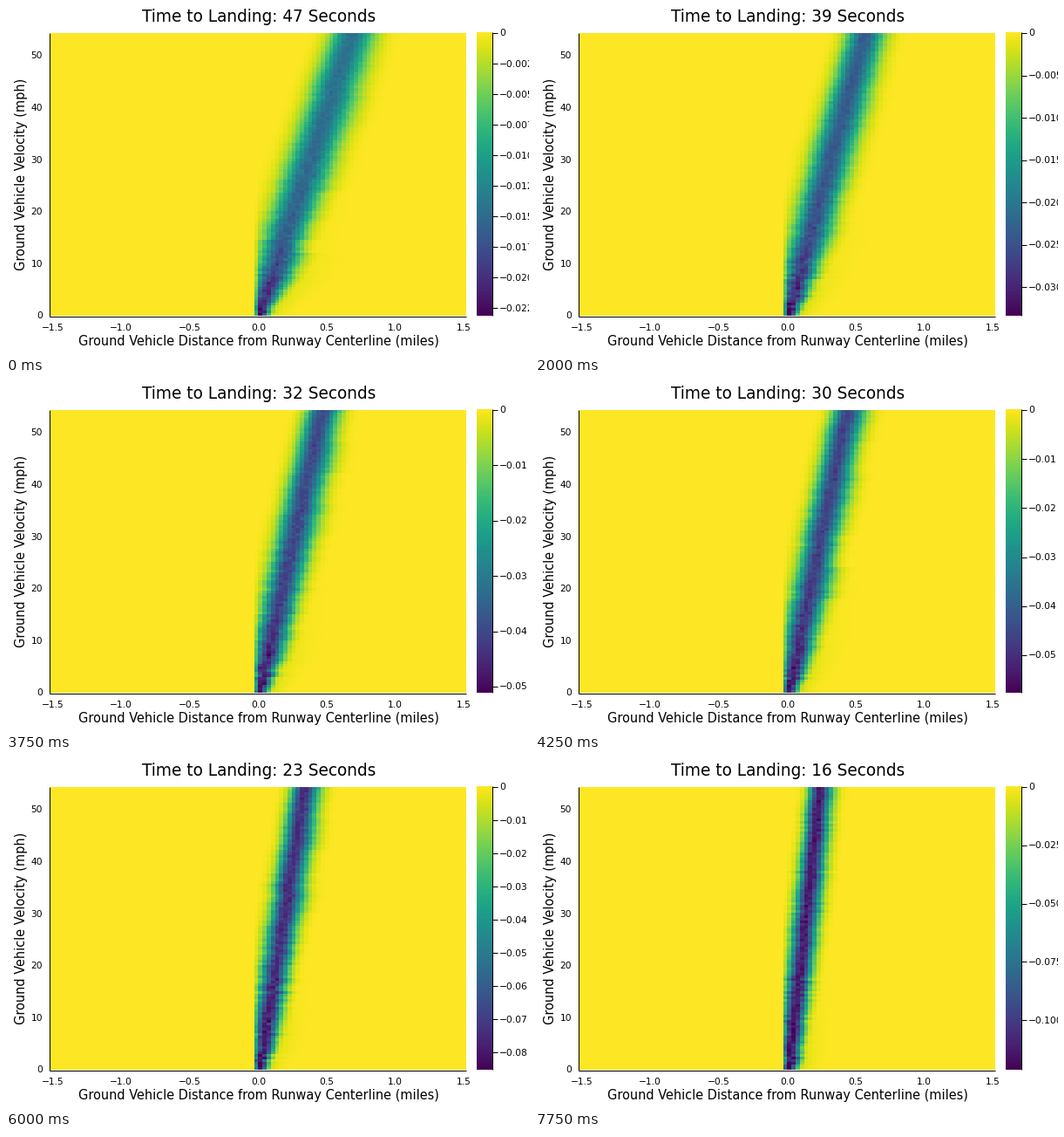
These frames come from a looping animation (600x400 px, 8000 ms). A matplotlib script:

```python
import numpy as np
import matplotlib.pyplot as plt
from matplotlib.animation import FuncAnimation

plt.rcParams["font.family"] = "DejaVu Sans"

W, H, DPI = 600, 400, 100
FRAMES, INTERVAL = 32, 250
START = 47                                   # seconds to landing at the start
LEFT, RIGHT, TOP, BOTTOM = 51, 528, 31, 355
BAR_LEFT, BAR_RIGHT, BAR_TOP = 540, 558, 30
COLS, ROWS = 100, 108
X_MAX = 1.515                                # miles at the right edge
PX_PER_MILE = (RIGHT - LEFT) / (2 * X_MAX)
X_ZERO = 289
PX_PER_MPH, Y_ZERO = 5.96, 354.5

# depth of the colour scale by seconds to landing
DEPTH_T = [16, 20, 27, 32, 39, 43, 47]
DEPTH = [0.1215, 0.0985, 0.0676, 0.0512, 0.0334, 0.0271, 0.02315]
# tick step -> decimals
STEPS = {0.0025: 4, 0.005: 3, 0.01: 2, 0.025: 3}

fig = plt.figure(figsize=(W / DPI, H / DPI), dpi=DPI, facecolor="white")
ax = fig.add_axes([0, 0, 1, 1])
ax.axis("off")


def label(x, y, s, px, ha="center", va="baseline", rotation=0):
    return ax.text(x, y, s, fontsize=px * 72 / DPI, ha=ha, va=va,
                   rotation=rotation, color="black")


def line(xs, ys, width=0.72):
    return ax.plot(xs, ys, color="black", lw=width, solid_capstyle="butt")[0]


def image(data, box, origin):
    return ax.imshow(data, cmap="viridis", vmin=-1, vmax=0, origin=origin,
                     extent=box, aspect="auto", interpolation="nearest")


def risk(t):
    """Relative risk (0..1) on the velocity/distance grid, lowest speed first."""
    rng = np.random.default_rng(t)
    v = (np.arange(ROWS)[:, None] + 0.5) * (BOTTOM - TOP) / ROWS / PX_PER_MPH
    x = (np.arange(COLS) + 0.5 - COLS / 2) * (RIGHT - LEFT) / COLS

    ragged = 0.35 + 0.65 * np.exp(-v / 30)
    center = (0.012 + 0.94 * v * t / 3600) * PX_PER_MILE
    center = center + rng.normal(0, 1.3, (ROWS, 1)) * ragged * (v > 1)
    drift = np.repeat(rng.normal(0, 0.05, ROWS // 12), 12)[:, None]

    d = x - center
    sigma = 5.5 + 0.27 * t * (1 - np.exp(-v / 8))
    sigma = sigma * np.where(d > 0, 1 + drift, 1 - 0.17 * (v / 54) ** 2)
    floor = 1.1 - 0.01 * t
    peak = floor + (1 - floor) * np.exp(-v / 11)
    p = peak * np.exp(-0.5 * (d / sigma) ** 2)
    tail = 0.12 * np.exp(-v / 10) * np.exp(-0.5 * (d / (2.2 * sigma)) ** 2)
    p = np.where(d > 0, np.maximum(p, tail), p)
    p *= 1 + rng.normal(0, 0.06, p.shape) * ragged

    # nothing lies behind the centerline beyond one cell
    p[:, :COLS // 2 - 1] = 0
    p[:, COLS // 2 - 1] *= 1.1 - 0.011 * t
    return np.clip(p, 0, 1)


heat = image(-risk(START), (LEFT, RIGHT, BOTTOM, TOP), "lower")
image(np.linspace(0, -1, 256)[:, None],
      (BAR_LEFT, BAR_RIGHT, BOTTOM, BAR_TOP), "upper")
ax.set_xlim(0, W)
ax.set_ylim(H, 0)

line([LEFT - 1] * 2, [TOP, BOTTOM + 1])
line([LEFT - 1, RIGHT], [BOTTOM + 1] * 2)
line([BAR_RIGHT] * 2, [BAR_TOP, BOTTOM])

for mile in np.arange(-1.5, 1.6, 0.5):
    label(X_ZERO + mile * PX_PER_MILE + 0.4, 371.5,
          f"{mile:.1f}".replace("-", "\u2212"), 10.6)
for mph in range(0, 60, 10):
    label(42, Y_ZERO - mph * PX_PER_MPH + 4, str(mph), 10.6, ha="right")

title = label(289.9, 18, "", 18.55)
label(289.5, 389, "Ground Vehicle Distance from Runway Centerline (miles)", 14.53)
label(25.5, 192.5, "Ground Vehicle Velocity (mph)", 14.53, "right", "center", 90)

bar_ticks = [(line([BAR_RIGHT, BAR_RIGHT + 6], [BAR_TOP] * 2),
              label(566, BAR_TOP, "", 10.6, ha="left")) for _ in range(11)]


def update(i):
    t = START - i
    title.set_text(f"Time to Landing: {t} Seconds")
    heat.set_data(-risk(t))

    depth = np.interp(t, DEPTH_T, DEPTH)
    step = next((s for s in STEPS if depth / s < 10), 0.025)
    for k, (mark, text) in enumerate(bar_ticks):
        shown = k * step <= depth
        mark.set_visible(shown)
        text.set_visible(shown)
        y = BAR_TOP + 0.5 + (BOTTOM - BAR_TOP - 0.5) * k * step / depth
        mark.set_ydata([y + 0.5] * 2)
        text.set_y(y + 4)
        text.set_text(f"\u2212{k * step:.{STEPS[step]}f}" if k else "0")
    return []


anim = FuncAnimation(fig, update, frames=FRAMES, init_func=lambda: [],
                     interval=INTERVAL, repeat=True, repeat_delay=0, blit=False)
plt.show()
```
